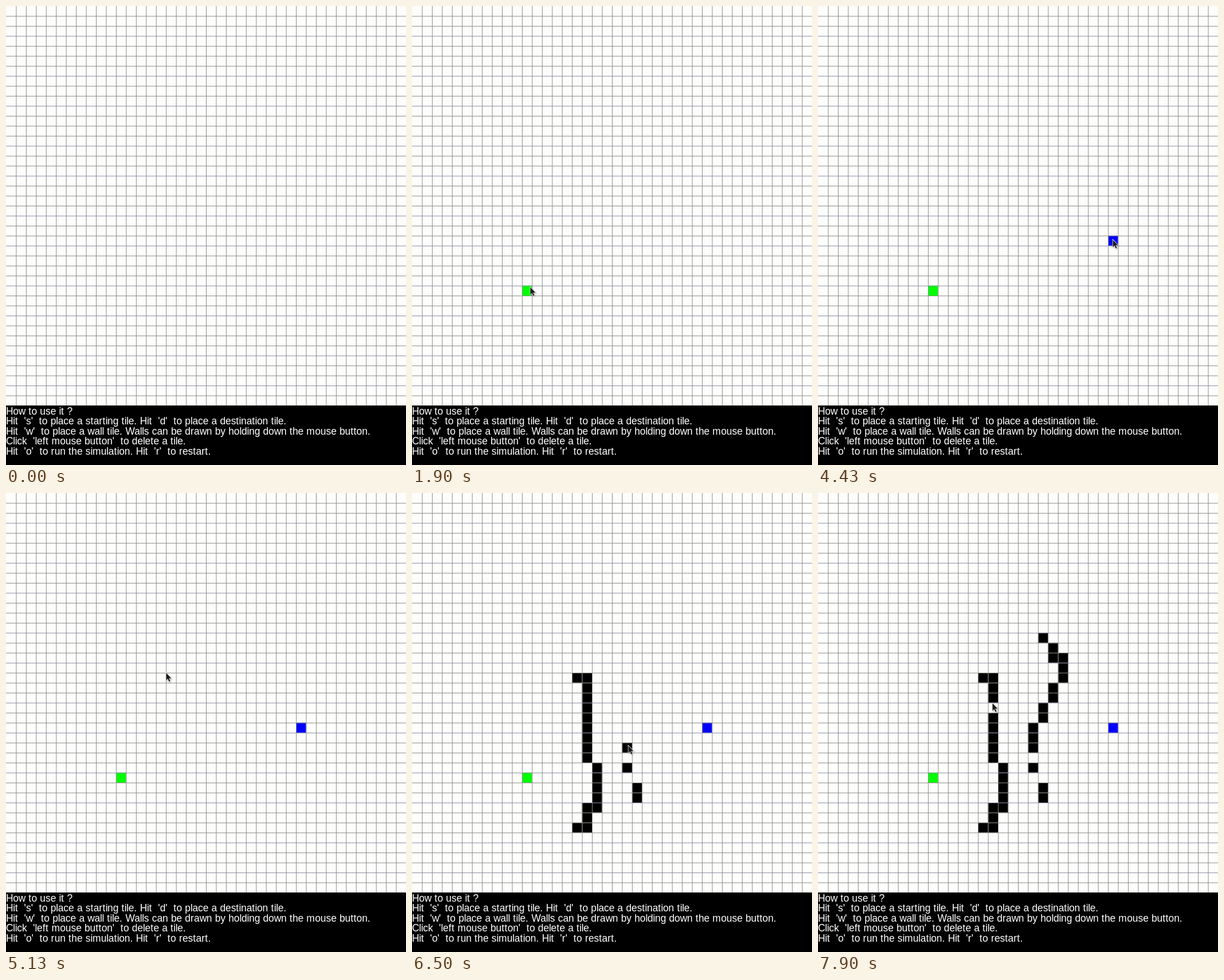
An HTML page with a canvas that plays this animation: 698x802 px, repeating every 8 s.

```html
<!DOCTYPE html>
<html lang="en">
<head>
<meta charset="utf-8">
<title>Path finding grid</title>
<style>
  html, body { margin: 0; width: 100%; height: 100%; overflow: hidden; background: #000; }
  canvas { display: block; }
</style>
</head>
<body>
<canvas id="stage" width="698" height="802"></canvas>
<script>
const LOOP = 8000, BOARD = 698, HEIGHT = 802, CELLS = 40;
const SCALE = BOARD / 800, PITCH = BOARD / CELLS;
const POLL = 30;
const ctx = document.getElementById('stage').getContext('2d');

const help = [
  "How to use it ?",
  "Hit  's'  to place a starting tile. Hit  'd'  to place a destination tile.",
  "Hit  'w'  to place a wall tile. Walls can be drawn by holding down the mouse button.",
  "Click  'left mouse button'  to delete a tile.",
  "Hit  'o'  to run the simulation. Hit  'r'  to restart."
];

// Key points of the pointer path: time, then position in cells.
const path = [
  [30, 38.6, 7.4], [230, 18.6, 42], [770, 18.6, 42],
  [1270, 12.1, 28], [1630, 11.8, 28.14], [1900, 11.8, 28.14],
  [2480, 23.8, 23.9], [2930, 27.4, 23], [3430, 27.91, 22.69],
  [3830, 28.2, 21.7], [4350, 29.45, 23.4], [4640, 29.45, 23.4],
  [5130, 16, 18], [5220, 16.5, 18.5], [5300, 17.4, 18.5],
  [5830, 18.28, 30.945], [6030, 16.9, 33.8],
  [6390, 22.5, 30.9], [6480, 21.45, 25.95], [6570, 21.99, 23],
  [6780, 24.2, 18.6], [6900, 24.3, 16.5], [7070, 23.15, 15.13],
  [7170, 22.4, 14.6], [7280, 20.5, 11.7], [7630, 17.42, 21.02]
];

function pointerAt(t) {
  const next = path.findIndex(p => p[0] > t);
  if (next === 0) return null;
  if (next < 0) return path[path.length - 1].slice(1);
  const [t0, x0, y0] = path[next - 1], [t1, x1, y1] = path[next];
  const f = (t - t0) / (t1 - t0);
  return [x0 + (x1 - x0) * f, y0 + (y1 - y0) * f];
}

// Every tile is placed or erased under the pointer.
const tiles = [];

function tileUnder(t) {
  const [col, row] = pointerAt(t).map(Math.floor);
  return { col, row, known: tiles.find(tile => tile.col === col && tile.row === row) };
}

function place(t, color) {
  const { col, row, known } = tileUnder(t);
  if (!known) tiles.push({ col, row, color, from: t, to: LOOP });
}

function drag(start, end) {
  for (let t = start; t <= end; t += POLL) place(t, '#000');
}

function erase(t) {
  const { known } = tileUnder(t);
  if (known) known.to = t;
}

place(1830, '#0f0');
place(4350, '#00f');
drag(5220, 6030);
drag(6390, 7170);
erase(7900);

function makeLayer(paint) {
  const layer = document.createElement('canvas');
  layer.width = BOARD;
  layer.height = HEIGHT;
  const c = layer.getContext('2d');
  c.scale(SCALE, SCALE);
  paint(c);
  return layer;
}

const backdrop = makeLayer(c => {
  c.fillStyle = '#000';
  c.fillRect(0, 0, 800, 1000);
  c.fillStyle = '#fdfdfc';
  c.fillRect(0, 0, 800, 800);

  c.font = '20px "Liberation Sans", Arial, sans-serif';
  c.fillStyle = '#fff';
  const width = text => c.measureText(text).width;
  help.forEach((line, i) => {
    let x = 0;
    // Whole-pixel advances with kerning, as a hinted bitmap renderer uses.
    [...line].forEach((char, n) => {
      const after = line[n + 1] || '';
      c.fillText(char, x, 818 + i * 20);
      x += Math.round(width(char + after) - width(after));
    });
  });
});

const grid = makeLayer(c => {
  const thickness = 1 / SCALE;
  for (let k = 1; k < CELLS; k++) {
    c.fillStyle = k % 7 === 0 || k % 7 === 3 ? '#8c8ca4' : '#8c8c84';
    c.fillRect(0, k * 20, 800, thickness);
  }
  c.fillStyle = '#8c8c8c';
  for (let k = 1; k < CELLS; k++) c.fillRect(k * 20, 0, thickness, 800);
});

const arrow = new Path2D('M.5 .5V13.2L3.4 10.5L5.5 15.4L7.5 14.5L5.4 9.8H9.4Z');

function drawPointer([col, row]) {
  ctx.save();
  ctx.translate(Math.round(col * PITCH), Math.round(row * PITCH));
  ctx.shadowColor = 'rgba(0,0,0,.3)';
  ctx.shadowBlur = 2;
  ctx.shadowOffsetX = ctx.shadowOffsetY = 1;
  ctx.strokeStyle = '#e4e4e4';
  ctx.lineWidth = 1.6;
  ctx.stroke(arrow);
  ctx.shadowColor = 'transparent';
  ctx.fillStyle = '#1c1c1c';
  ctx.fill(arrow);
  ctx.restore();
}

const start = performance.now();

function draw(now) {
  const t = Math.max(0, now - start) % LOOP;
  ctx.drawImage(backdrop, 0, 0);
  for (const { col, row, color, from, to } of tiles) {
    if (t < from || t >= to) continue;
    ctx.fillStyle = color;
    ctx.fillRect(col * PITCH, row * PITCH, PITCH, PITCH);
  }
  ctx.drawImage(grid, 0, 0);
  const position = pointerAt(t);
  if (position) drawPointer(position);
  requestAnimationFrame(draw);
}
draw(start);
</script>
</body>
</html>
```
